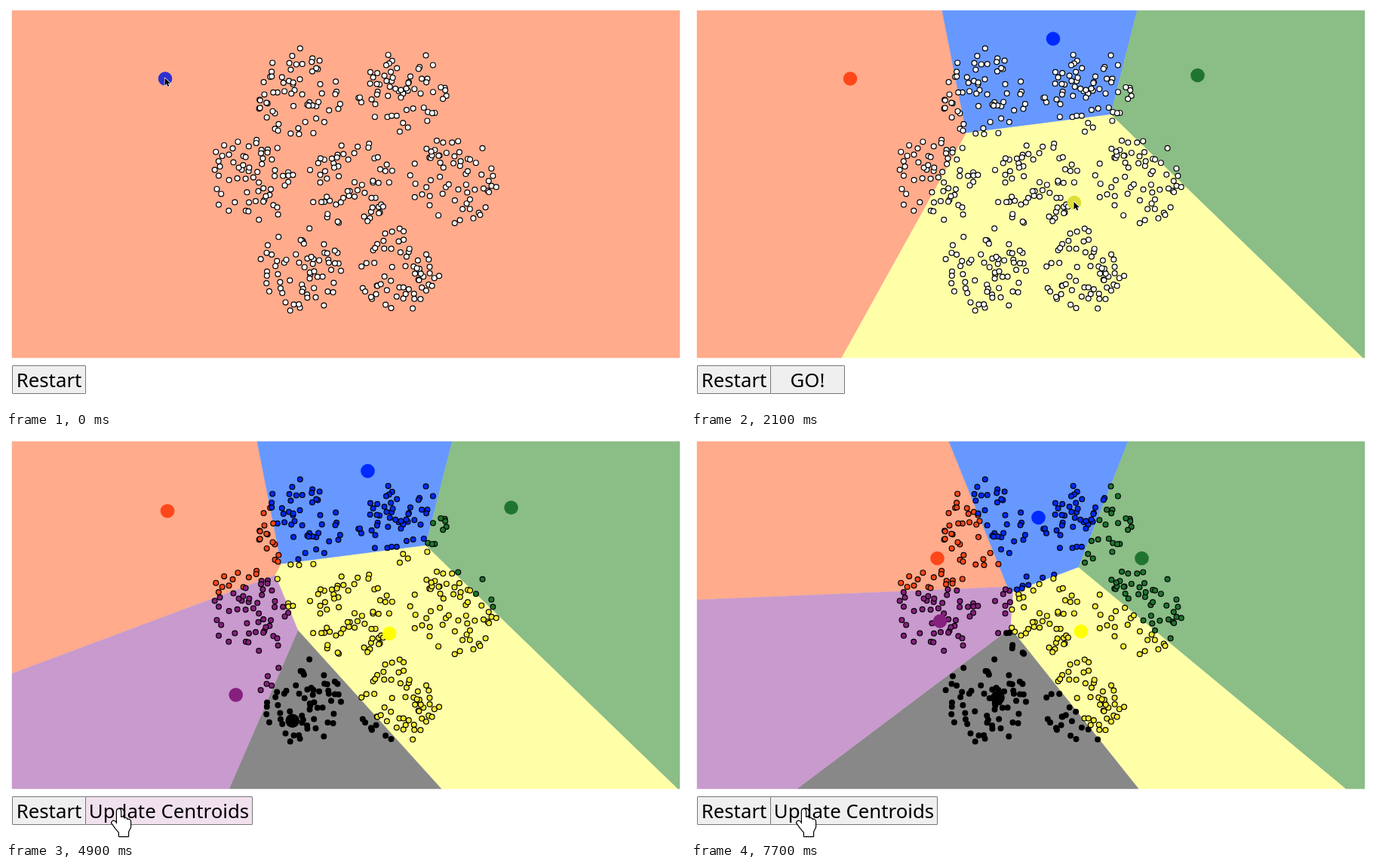
Recreate the animation shown at these times as an HTML page with a canvas. Size 900 px wide and 535 px high, loop 8000 ms.

```html
<!DOCTYPE html>
<html lang="en">
<head>
<meta charset="utf-8">
<title>K-means clustering</title>
<style>
  html, body { margin: 0; width: 100%; height: 100%; overflow: hidden; background: #fff; }
  canvas { position: absolute; left: 0; top: 0; }
  .btn {
    position: absolute; top: 477px; height: 38px; box-sizing: border-box;
    border: 1px solid #767676; border-radius: 1px; background: #efefef; color: #000;
    font: 25.8px/37px "Noto Sans", "Open Sans", sans-serif;
    text-align: center; white-space: nowrap;
  }
  #restart { left: 8px; width: 98px; }
  #action { left: 105px; }
</style>
</head>
<body>
<div class="btn" id="restart">Restart</div>
<div class="btn" id="action"></div>
<canvas id="stage" width="900" height="535"></canvas>
<script>
const ctx = document.getElementById('stage').getContext('2d');
const action = document.getElementById('action');
const STEP = 700, LOOP = 8000;
const BOX = [[8, 6], [893, 6], [893, 467], [8, 467]];

// Clusters in the order they are placed; to = mean of the assigned points.
const clusters = [
  { at: [211, 96.5], to: [326.5, 161], fill: '#ff4719', area: '#ffab8c', hover: '#3030d0' },
  { at: [480, 43.5], to: [460.5, 107], fill: '#002aff', area: '#6698ff', hover: '#0a640f' },
  { at: [671.5, 92], to: [597.5, 161], fill: '#1f7530', area: '#8bbd87', hover: '#1f7020' },
  { at: [508, 261], to: [517, 258], fill: '#ffff00', area: '#ffffa8', hover: '#dede3a' },
  { at: [379, 377.5], to: [406.5, 346], fill: '#000000', area: '#888888', hover: '#100010' },
  { at: [304, 345], to: [330, 244.5], fill: '#86207f', area: '#c89acd', hover: '#80206f' }
];
const dotFill = i => i === 3 ? '#ffee33' : clusters[i].fill;

const buttons = {
  go: ['GO!', 99],
  update: ['Update Centroids', 222],
  reassign: ['Reassign Points', 200]
};

// placed: centroids on stage, move: share of the way to the means
const white = { first: 0, second: 0, move: 0 };
const steps = [
  { placed: 1, arrow: 1 },
  { placed: 2, arrow: 1, button: 'go' },
  { placed: 3, arrow: 1, button: 'go' },
  { placed: 4, arrow: 1, button: 'go' },
  { placed: 5, arrow: 1, button: 'go' },
  { placed: 6, arrow: 1, button: 'go', hand: 1 },
  { placed: 6, button: 'update', hand: 1 },
  { placed: 6, button: 'update', hand: 1, first: 1, move: 0.026, tint: 1 },
  { placed: 6, button: 'update', hand: 1, first: 1, move: 0.87 },
  { placed: 6, button: 'reassign', hand: 1, first: 1, move: 1, tint: 1 },
  { placed: 6, button: 'reassign', hand: 1, first: 1, move: 1, second: 0.5 },
  { placed: 6, button: 'update', hand: 1, first: 1, move: 1, second: 1 }
].map(s => ({ ...white, ...s }));

function random(seed) {
  return () => {
    seed = seed + 0x6d2b79f5 | 0;
    let t = Math.imul(seed ^ seed >>> 15, 1 | seed);
    t = t + Math.imul(t ^ t >>> 7, 61 | t) ^ t;
    return ((t ^ t >>> 14) >>> 0) / 4294967296;
  };
}

function nearest(p, sites) {
  const d = sites.map(s => Math.hypot(p[0] - s[0], p[1] - s[1]));
  return d.indexOf(Math.min(...d));
}

// Seven discs: one in the middle, six around it.
const rnd = random(11);
const starts = clusters.map(c => c.at), means = clusters.map(c => c.to);
const points = Array.from({ length: 448 }, (_, i) => {
  const k = i % 7, ring = k ? 135 : 0, turn = k * Math.PI / 3;
  const r = 59 * Math.sqrt(rnd()), a = rnd() * 2 * Math.PI;
  const p = [458 + ring * Math.cos(turn) + r * Math.cos(a),
             232 + ring * Math.sin(turn) + r * Math.sin(a)];
  return { p, first: nearest(p, starts), second: nearest(p, means) };
});

// Keep the part of the polygon that is nearer to a than to b.
function clip(poly, a, b) {
  const side = p => (p[0] - (a[0] + b[0]) / 2) * (b[0] - a[0])
                  + (p[1] - (a[1] + b[1]) / 2) * (b[1] - a[1]);
  return poly.flatMap((p, i) => {
    const q = poly[(i + 1) % poly.length], sp = side(p), sq = side(q);
    const out = sp <= 0 ? [p] : [];
    if (sp * sq < 0) {
      const t = sp / (sp - sq);
      out.push([p[0] + (q[0] - p[0]) * t, p[1] + (q[1] - p[1]) * t]);
    }
    return out;
  });
}

function areas(sites) {
  sites.forEach((s, i) => {
    const cell = sites.reduce((poly, o) => o === s ? poly : clip(poly, s, o), BOX);
    ctx.beginPath();
    cell.forEach(p => ctx.lineTo(p[0], p[1]));
    ctx.closePath();
    ctx.fillStyle = ctx.strokeStyle = clusters[i].area;
    ctx.fill();
    ctx.lineWidth = 0.5;
    ctx.stroke();
  });
}

function disc([x, y], r, fill, line) {
  ctx.beginPath();
  ctx.arc(x, y, r, 0, 2 * Math.PI);
  ctx.fillStyle = fill;
  ctx.fill();
  if (line) {
    ctx.strokeStyle = '#000';
    ctx.lineWidth = line;
    ctx.stroke();
  }
}

const arrow = new Path2D('M0 0V10L2.4 7.8L4 11.4L5.8 10.6L4.2 7.2H7.4Z');
const hand = new Path2D('M7 17V3Q7 0 9.5 0Q12 0 12 3V11Q16 9.500 16.500 12.500' +
  'Q20 11 20.500 14Q25 13 25 17V24L22 30V36H10V31L5 25L0 18Q2 14 5 17L7 20Z');

function shape(path, x, y, fill, line, width) {
  ctx.save();
  ctx.translate(x, y);
  ctx.lineWidth = width;
  ctx.lineJoin = 'round';
  ctx.strokeStyle = line;
  ctx.stroke(path);
  ctx.fillStyle = fill;
  ctx.fill(path);
  ctx.restore();
}

function setButton(s) {
  action.style.display = s.button ? 'block' : 'none';
  if (!s.button) return;
  const [label, width] = buttons[s.button];
  action.textContent = label;
  action.style.width = width + 'px';
  action.style.background = s.tint ? '#f1e0ee' : '#efefef';
}

function draw(s) {
  ctx.clearRect(0, 0, 900, 535);
  areas((s.move === 1 ? means : starts).slice(0, s.placed));

  points.forEach((d, i) => {
    const n = i / points.length;
    const fill = n < s.second ? dotFill(d.second) : n < s.first ? dotFill(d.first) : '#fff';
    disc(d.p, 3.4, fill, 1.2);
  });

  clusters.slice(0, s.placed).forEach((c, i) => {
    const pos = c.at.map((v, k) => v + (c.to[k] - v) * s.move);
    disc(pos, 9.3, s.arrow && i === s.placed - 1 ? c.hover : c.fill);
  });

  if (s.arrow) {
    const [x, y] = clusters[s.placed - 1].at;
    shape(arrow, x - 0.5, y - 1, '#000', '#fff', 1.4);
  }
  if (s.hand) shape(hand, 140, 494, '#fff', '#000', 2.4);
  setButton(s);
}

let shown = -1;
function tick() {
  const now = Math.floor(performance.now() % LOOP / STEP);
  if (now !== shown) draw(steps[shown = now]);
  requestAnimationFrame(tick);
}
tick();
</script>
</body>
</html>
```
